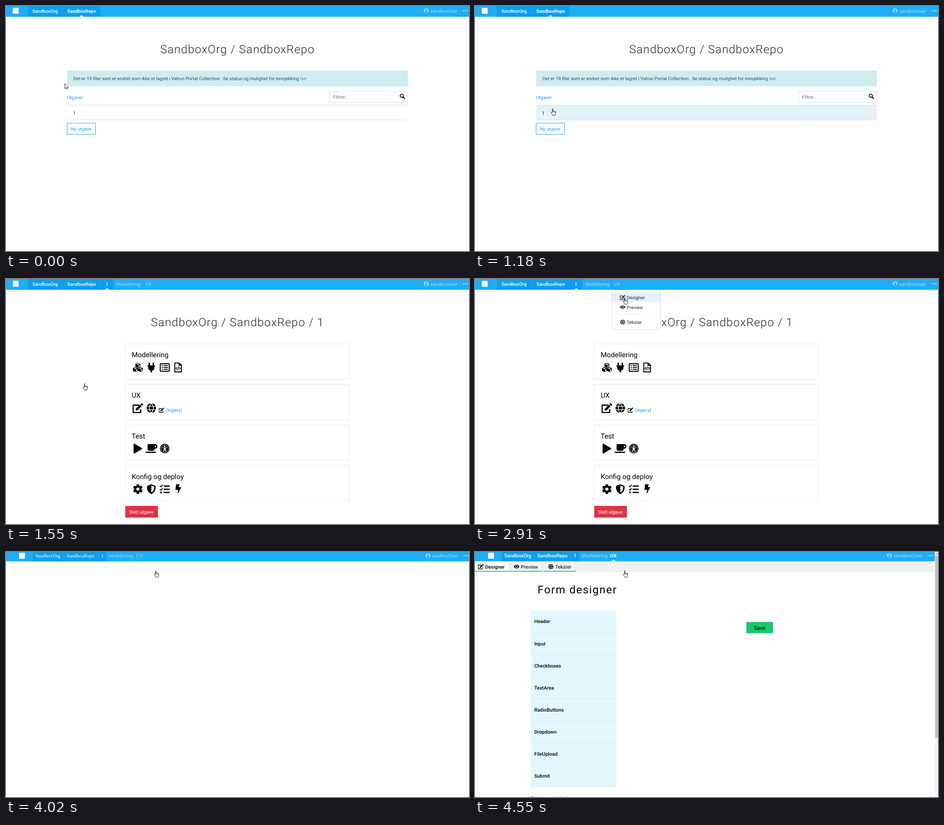
These frames come from a looping animation (1027x545 px, 5550 ms). An HTML page:

```html
<!DOCTYPE html>
<html lang="nb">
<head>
<meta charset="utf-8">
<title>Studio</title>
<style>
  html, body { margin: 0; width: 100%; height: 100%; overflow: hidden; background: #fff; }
  svg { display: block; width: 100%; height: 100%; font-family: Roboto, sans-serif; }
  text { white-space: pre; text-rendering: geometricPrecision; }
</style>
</head>
<body>
<svg id="stage" viewBox="0 0 1027 545"></svg>
<script>
const BLUE = '#1eaef7', TAB = '#0b9fee', LINK = '#1e98f5', HOVER = '#e4f2fb', INK = '#212529';
const ORG = 'SandboxOrg', REPO = 'SandboxRepo', USER = 'sandboxUser';
const LOOP = 5550, BODY = 10.25;

const rect = (x, y, w, h, fill, extra = '') =>
  `<rect x="${x}" y="${y}" width="${w}" height="${h}" fill="${fill}" ${extra}/>`;
const frame = (x, y, w, h, stroke) => rect(x, y, w, h, '#fff', `stroke="${stroke}"`);
const text = (str, x, y, size = BODY, fill = INK, extra = '') =>
  `<text x="${x}" y="${y}" font-size="${size}" fill="${fill}" ${extra}>${str}</text>`;
const fill = (d, color = 'currentColor') => `<path d="${d}" fill="${color}"/>`;
const line = (d, width = 2, color = 'currentColor') =>
  `<path d="${d}" fill="none" stroke="${color}" stroke-width="${width}"/>`;
const circle = (r, color = 'currentColor', x = 0, y = 0, extra = '') =>
  `<circle cx="${x}" cy="${y}" r="${r}" fill="${color}" ${extra}/>`;
const at = (x, y, body, scale = 1, color = 'currentColor') =>
  `<g transform="translate(${x} ${y}) scale(${scale})" color="${color}">${body}</g>`;

// Icons are centred on 0,0 and about 22 units wide.
const cube = (x, y) => at(x, y,
  fill('M0-5.4 5.5-3V3L0 5.6-5.5 3V-3Z') + fill('M0-4 3.6-2.5 0-1-3.6-2.5Z', '#fff') +
  fill('M1 .9 4.2-.5V2.2L1 3.8Z', '#fff'));
const cog = () => {
  const teeth = [0, 60, 120].map(a =>
    `<rect x="-3" y="-10.6" width="6" height="21.2" rx="1" fill="currentColor" transform="rotate(${a})"/>`);
  return teeth.join('') + circle(8) + circle(3.4, '#fff');
};
const rows = (ys, row) => ys.map(row).join('');
const ICONS = {
  cubes: cube(0, -4.8) + cube(-5.5, 4.4) + cube(5.5, 4.4),
  plug: fill('M-6-4V-10Q-4.5-12-3-10V-4ZM3-4V-10Q4.5-12 6-10V-4ZM-8.5-4.5H8.5V-2H7V0Q7 6 1.6 7V11H-1.6V7Q-7 6-7 0V-2H-8.5Z'),
  list: rect(-10, -8.5, 20, 17, 'none', 'rx="1.5" stroke="currentColor" stroke-width="2.2"') +
    rows([-4.2, 0, 4.2], y => circle(1.3, 'currentColor', -5.6, y) + line(`M-2.6 ${y}H7`)),
  file: line('M-7.5-9.8H2.5L7.3-5V9.8H-7.5ZM2-9.8V-4.5H7.3', 2.1) +
    line('M-2.6-.8-5 2-2.6 4.8M2.6-.8 5 2 2.6 4.8M1-2-1 6', 1.5),
  edit: at(0, .6, line('M2.5-7.2H-10.8V9.6H6.5V2', 2.6) +
    fill('M-5.2 5.2-4.6.8 4.8-8.6 8.6-4.8-.8 4.6ZM5.8-9.6 7.4-11.2Q8.4-12 9.4-11.2L11.8-9.2Q12.4-8.2 11.8-7.4L9.6-5.8Z'), .97),
  globe: circle(10.6) +
    line('M-11-3.6H11M-11 3.6H11M0-11Q-9 0 0 11Q9 0 0-11', 1.4, '#fff'),
  play: fill('M-9.5-9.6Q-9.3-11.6-7.4-10.7L8.8-1.3Q10.4 0 8.8 1.3L-7.4 10.7Q-9.3 11.6-9.5 9.6Z'),
  coffee: fill('M-8-10H8Q13.5-9.6 13.5-4.6T8 .6H7.6Q7.2 5 3.5 5H-4.5Q-8 5-8.4 1ZM-13.2 7H11.4Q10.6 9.7 8.4 9.7H-10.4Q-12.6 9.7-13.2 7Z') +
    fill('M8-7V-2.4Q10.7-2.6 10.7-4.7T8-7Z', '#fff'),
  access: circle(10.6) + circle(8.5, 'none', 0, 0, 'stroke="#fff" stroke-width=".8"') +
    circle(1.8, '#fff', 0, -4.8) + fill('M-5.4-2.9-1.5-1.9H1.5L5.4-2.9V-1.5L2-.6V1.6L3.6 6.2 2.3 6.7 0 2.4-2.3 6.7-3.6 6.2-2 1.6V-.6L-5.4-1.5Z', '#fff'),
  cog: cog(),
  shield: fill('M0-11 9.6-7Q10.5 6 0 11Q-10.5 6-9.6-7Z') + fill('M0-7.8 6.6-5.1Q6.6 4 0 7.6Z', '#fff'),
  tasks: rows([-7, 0.5], y => line(`M-10.6 ${y}L-8.6 ${y + 2} -4.6 ${y - 2.4}`, 1.9)) + circle(2, 'currentColor', -8.4, 7.4) +
    rows([-6.8, 0.4, 7.4], y => line(`M-2.4 ${y}H11`, 2.8)),
  bolt: fill('M-4.6-11H3.4L1.6-4.4H7.2L-1.6 11.2-.2 1.6H-6.2Z'),
  eye: fill('M-12 0Q0-15.5 12 0Q0 15.5-12 0Z') + circle(5.4, '#fff') + circle(3.6),
  search: circle(6.4, 'none', -2.5, -2.5, 'stroke="currentColor" stroke-width="3"') + line('M2 2 9.5 9.5', 4),
  user: circle(10.6) + circle(4.1, BLUE, 0, -3.2) + fill('M-7 6Q-6 1.8-3 2H3Q6 1.8 7 6Q0 12.5-7 6Z', BLUE)
};
const icon = (name, x, y, scale = 1, color = '#000') => at(x, y, ICONS[name], scale, color);

// tabs: [left, right, label, label x, weight]; links: [label, x, colour, weight]
function header({ h, base, size = BODY, family = 'Roboto, sans-serif', logo, tabs, links = [], user, dots, notch }) {
  const mid = base - 3.9, pale = '#a0dcfb';
  return `<g font-family="${family}">` + rect(0, 0, 1027, h, BLUE) + rect(logo, mid - 6.5, 13, 13, '#fff') +
    tabs.map(([l, r, label, x, weight]) => rect(l, 0, r - l - .7, h, TAB) +
      text(label, x, base, size, '#fff', `font-weight="${weight}"`)).join('') +
    links.map(([label, x, color = pale, weight = 400]) =>
      text(label, x, base, size, color, `font-weight="${weight}"`)).join('') +
    icon('user', user, mid, .52, pale) + text(USER, user + 9.2, base, size, pale) +
    [0, 4.2, 8.4].map(d => circle(1.5, pale, dots + d, mid)).join('') +
    (notch ? fill(`M${notch - 4.5} ${h}l4.5-4 4.5 4Z`, '#fff') : '') + '</g>';
}
const title = str => text(str, 513.4, 105, 25.4, INK,
  'font-weight="300" letter-spacing="1.2" text-anchor="middle"');

const topBar = { h: 24, base: 14.5, logo: 15, user: 932, dots: 1014.5 };

const home = header({ ...topBar, notch: 167.5,
    tabs: [[48, 125, ORG, 58.5, 500], [125, 210, REPO, 136, 700]] }) +
  title(`${ORG} / ${REPO}`) +
  rect(136, 144, 755, 34, '#d0ecf1', 'stroke="#c0e4ea" stroke-width=".7"') +
  text('Det er 19 filer som er endret som ikke er lagret i Velrun Portal Collection.', 149.5, 165, BODY, '#24535f') +
  text('Se status og mulighet for innsjekking', 481.5, 165, BODY, '#24535f') +
  text('her', 653, 165, BODY, LINK) +
  text('Utgaver', 135.2, 207, BODY, LINK) +
  frame(717.5, 189.5, 173, 25, '#d9dde1') + text('Filtrer...', 725.5, 206, BODY, '#6c757d') +
  icon('search', 879.3, 201, .56) +
  rect(136, 220, 755, 1, '#dee2e6') + rect(136, 253, 755, 1, '#dee2e6') + text('1', 148.4, 241.5) +
  frame(135.5, 260.5, 63, 25, LINK) + text('Ny utgave', 144, 277, BODY, LINK);

const rowHover = rect(136, 220, 755, 34, HOVER) + rect(136, 220, 755, 1, '#cfdfe9') +
  rect(136, 253, 755, 1, '#cfdfe9') + text('1', 148.4, 241.5);

const card = (i, name, icons) => {
  const y = 143.6 + i * 90.2;
  return frame(264.5, Math.round(y) + .5, 497, 79, '#e6e8ea') + text(name, 278.7, y + 30.5, 15.6, '#000') +
    icons.map((name, k) => icon(name, 292.5 + k * 29.8, y + 53.2)).join('');
};
const release = header({ ...topBar, notch: 224.5,
    tabs: [[48, 125, ORG, 58.5, 500], [125, 210, REPO, 136.2, 500], [210, 239, '1', 221, 500]],
    links: [['Modellering', 244.5], ['UX', 309]] }) +
  title(`${ORG} / ${REPO} / 1`) +
  card(0, 'Modellering', ['cubes', 'plug', 'list', 'file']) +
  card(1, 'UX', ['edit', 'globe']) +
  icon('edit', 345, 291.6, .52) + text('(legacy)', 354.5, 295.3, BODY, LINK) +
  card(2, 'Test', ['play', 'coffee', 'access']) +
  card(3, 'Konfig og deploy', ['cog', 'shield', 'tasks', 'bolt']) +
  rect(264.5, 504.7, 72.5, 26, '#dc3545') + text('Slett utgave', 273.3, 521.8, BODY, '#fff');

const menuItem = (name, label, y) => icon(name, 327.5, y, .52, INK) + text(label, 336.5, y + 4);
const menuBox = frame(303.5, 24.5, 108, 87.5, '#d8dbde') + rect(304, 78, 107, 1, '#e9ecef');
const menuItems = menuItem('edit', 'Designer', 41) + menuItem('eye', 'Preview', 62.6) + menuItem('globe', 'Tekster', 95.8);
const menu = menuBox + menuItems;
const menuHover = menuBox + rect(304, 29.5, 107, 21.6, HOVER) + menuItems;

const blank = header({ h: 20.8, base: 12.2, size: 10.9, family: "'Liberation Serif', serif", logo: 29, user: 936, dots: 1017,
  tabs: [[59, 129, ORG, 65.3, 400], [129, 205, REPO, 135, 400], [205, 223, '1', 211, 400]],
  links: [['Modellering', 227.7], ['UX', 288.6]] });

const formHeader = active => header({ h: 20.8, base: 12, size: 10.95, logo: 29, user: 919, dots: 1005.5, notch: active && 307.5,
  tabs: [[59, 132, ORG, 65, 500], [132, 212, REPO, 138.2, 500], [212, 232, '1', 219, 500]],
  links: [['Modellering', 236.5], active ? ['UX', 300, '#fff', 700] : ['UX', 300]] });
const widgets = ['Header', 'Input', 'Checkboxes', 'TextArea', 'RadioButtons', 'Dropdown', 'FileUpload', 'Submit'];
const formBody =
  text('Form designer', 138.8, 69, 24, '#000', 'letter-spacing="1.75"') +
  rect(123.7, 107.8, 190, 392.4, '#e3f7ff') +
  widgets.map((name, i) => rect(123.7, 156 + i * 49.05, 190, 1, '#d3edf8') +
    text(name, 131.4, 135.8 + i * 49.05, 10.9, '#000', 'font-weight="500"')).join('') +
  rect(602, 133, 59, 25, '#17c96b') + text('Save', 631.3, 150.2, 12.2, '#000', 'text-anchor="middle"') +
  text('Api connections', 123.5, 529.3, 12.2, '#000') +
  `<path d="M124 543.8H314" stroke="${BLUE}" stroke-width="2" stroke-dasharray="2 2"/>`;
const scrollbar = thumb => rect(1020, 0, 7, 545, '#f1f1f1') + rect(1020.7, 8, 6.3, thumb, '#c1c1c1') +
  fill('M1021.5 5l2-2.4 2 2.4Z', '#777');
const form = formHeader(false) + formBody + scrollbar(416);

const subTab = (x, w, name, label, weight, bg) => rect(x, 21, w, 22.5, bg) + rect(x, 42, w, 1.7, BLUE) +
  icon(name, x + 13, 32.4, .54) + text(label, x + 22.4, 36.6, 10.9, '#000', `font-weight="${weight}"`);
const formTabs = formHeader(true) + rect(0, 20.8, 1020, 22.7, '#f1f1f1') +
  subTab(0, 75.3, 'edit', 'Designer', 500, '#fff') +
  subTab(79.2, 71.3, 'eye', 'Preview', 400, '#f1f1f1') + rect(76, 42, 4, 1.7, BLUE) +
  subTab(155.3, 68.6, 'globe', 'Tekster', 400, '#f1f1f1') + rect(152, 42, 4, 1.7, BLUE) +
  rect(75.3, 21, .8, 22, '#ddd') + rect(150.7, 21, .8, 22, '#ddd') +
  at(0, 22.7, formBody) + scrollbar(406);

const pointer = d => `<path d="${d}" fill="#fff" stroke="#000" stroke-width=".85" stroke-linejoin="round"/>`;
const arrow = pointer('M.5.5V12L3.1 9.5 4.8 13.5 6.5 12.7 4.9 8.9H8.4Z');
const hand = pointer('M3.5 9V1.3Q3.5.5 4.3.5T5.1 1.3V5.6Q6.9 5 7.2 6.2 8.9 5.6 9.2 6.8 10.7 6.5 10.7 8V11Q10.6 13 9.5 15.2H4.2Q3 12.2.6 9.6.5 8 2 8.2Z') +
  line('M5.1 5.6V8.6M7.2 6.2V8.8M9.2 6.8V9', .7);

// [start in ms, page, overlay, cursor, x, y]
const steps = [
  [0, home, '', arrow, 130, 172],
  [520, home, '', hand, 168, 228],
  [1180, home, rowHover, hand, 168, 228],
  [1550, release, '', hand, 170, 232],
  [1870, release, '', arrow, 244, 98],
  [2170, release, menu, hand, 310, 7],
  [2330, release, menu, hand, 325, 36],
  [2910, release, menuHover, hand, 328, 41],
  [4020, blank, '', hand, 328, 41],
  [4320, form, '', hand, 328, 41],
  [4550, formTabs, '', hand, 328, 41]
];

const stage = document.getElementById('stage');
const begin = performance.now();
let shown;
function draw() {
  const t = (performance.now() - begin) % LOOP;
  const step = steps.findLast(([start]) => start <= t);
  if (step !== shown) {
    const [, page, overlay, cursor, x, y] = shown = step;
    stage.innerHTML = page + overlay + at(x, y, cursor, 1, '#000');
  }
  requestAnimationFrame(draw);
}
draw();
</script>
</body>
</html>
```
